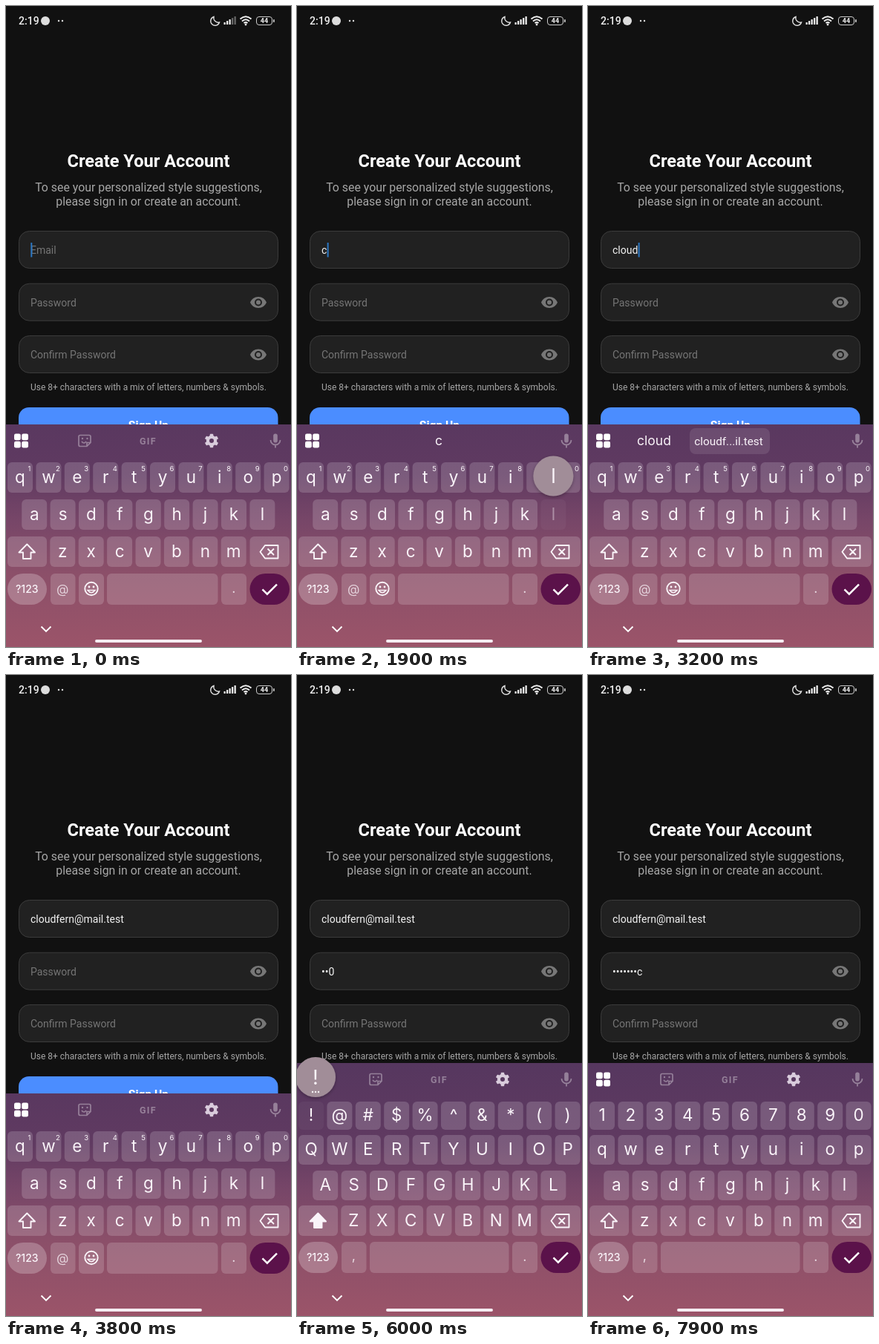
Write an HTML page that moves like this. It is 384 by 864 pixels and loops after 8000 ms.

```html
<!DOCTYPE html>
<html lang="en">
<head>
<meta charset="utf-8">
<title>Sign-up form</title>
<style>
  html, body { margin: 0; width: 100%; height: 100%; overflow: hidden; background: #111; }
  svg { display: block; width: 384px; height: 864px; font-family: Roboto, sans-serif; }
  .key { font-family: Inter, sans-serif; }
</style>
</head>
<body>
<svg id="stage" viewBox="0 0 384 864"></svg>
<script>
const LOOP = 8000, PITCH = 38.4;
const EMAIL = 'cloudfern@mail.test', CHIP = 'cloudf...il.test';
const DIGITS = '1234567890', SYMBOLS = '!@#$%^&*()';
const LETTERS = ['qwertyuiop', 'asdfghjkl', 'zxcvbnm'];
const ROW_X = [19, 38.2, 76.3];
const INK = '#faf4f9';

// Key presses: character, finger down, finger up
const emailKeys = [['c', 1600, 1700], ['l', 1900, 2000], ['o', 2100, 2200],
  ['u', 2500, 2600], ['d', 2800, 2900]];
const passKeys = [['X', 4700, 4700], ['v', 4800, 4900], ['0', 5300, 5300], ['!', 6000, 6100],
  ['f', 6400, 6500], ['7', 6700, 6800], ['x', 6900, 7000], ['c', 7050, 7100]];
const allKeys = [...emailKeys, ...passKeys];
const FILLED = 3300, NEXT = 3900, READY = 4200;
const caretResets = [0, FILLED, READY, ...allKeys.map(k => k[2])];

const stage = document.getElementById('stage');
const pen = document.createElement('canvas').getContext('2d');
const within = (t, a, b) => t >= a && t < b;
const esc = s => s.replace(/&/g, '&amp;').replace(/</g, '&lt;');

const rect = (x, y, w, h, r, fill, more = '') =>
  `<rect x="${x}" y="${y}" width="${w}" height="${h}" rx="${r}" fill="${fill}" ${more}/>`;
const circle = (x, y, r, fill, more = '') =>
  `<circle cx="${x}" cy="${y}" r="${r}" fill="${fill}" ${more}/>`;
const line = (d, color, w, more = '') =>
  `<path d="${d}" fill="none" stroke="${color}" stroke-width="${w}" ${more}/>`;
const text = (s, x, y, size, fill, more = '') =>
  `<text x="${x}" y="${y}" font-size="${size}" fill="${fill}" ${more}>${esc(s)}</text>`;
const MID = 'text-anchor="middle"';
const label = (s, x, y, size, more = '') =>
  text(s, x, y, size, INK, `class="key" ${MID} ${more}`);

function statusBar(t) {
  let s = text('2:19', 17, 25, 14, '#eee', 'font-weight="500"') + circle(53, 20, 6, '#ddd') +
    circle(71, 20, 1.2, '#ddd') + circle(76, 20, 1.2, '#ddd') +
    line('M280 14.5A6 6 0 1 0 287.5 22A6.2 6.2 0 0 1 280 14.5Z', '#ddd', 1.4);
  for (let i = 0; i < 5; i++) {
    const h = 3 + i * 2;
    s += rect(293.5 + i * 3.5, 25 - h, 2.3, h, 0.6, t < 1000 && i > 2 ? '#666' : '#eee');
  }
  s += line('M315.5 17.5Q323 11 330.5 17.5M318 20.5Q323 16 328 20.5M320.5 23Q323 21 325.5 23', '#eee', 2) +
    circle(323, 25, 1.4, '#eee');
  return s + rect(337.5, 14.5, 21, 11, 3.5, 'none', 'stroke="#ccc"') + rect(360, 18, 1.8, 4, 0.8, '#ccc') +
    text('44', 348, 23.3, 9, '#eee', MID + ' font-weight="700"');
}

function eye(y) {
  return `<path transform="translate(328 ${y - 12})" fill="#777" fill-rule="evenodd" d="M12 4.5C7 4.5 2.7 7.6 1 12c1.7 4.4 6 7.5 11 7.5s9.3-3.1 11-7.5c-1.7-4.4-6-7.5-11-7.5zM12 17a5 5 0 1 1 0-10 5 5 0 0 1 0 10zm0-8a3 3 0 1 0 0 6 3 3 0 0 0 0-6z"/>`;
}

function field(y, hint, value, caret) {
  let s = rect(17.5, y, 349, 50, 14, '#212121', 'stroke="#3c3c3c"') +
    text(value || hint, 33, y + 30.5, 14, value ? '#f2f2f2' : '#757575');
  if (caret) {
    pen.font = '14px Roboto, sans-serif';
    s += rect((33.3 + pen.measureText(value).width).toFixed(2), y + 15.5, 2, 19.5, 0, '#2b78c4');
  }
  return s;
}

function form(t) {
  const typed = keys => keys.filter(k => t >= k[2]).map(k => k[0]).join('');
  const email = t >= FILLED ? EMAIL : typed(emailKeys);
  const pass = typed(passKeys).replace(/.(?=.)/g, '•');
  const reset = Math.max(...caretResets.filter(r => r <= t));
  const caret = (t - reset) % 1000 < 500;
  const sub = (s, y) => text(s, 192, y, 15.87, '#a6a6a6', MID);
  return text('Create Your Account', 192, 217, 23.6, '#fff', MID + ' font-weight="700"') +
    sub('To see your personalized style suggestions,', 250) +
    sub('please sign in or create an account.', 269) +
    field(303.5, 'Email', email, caret && t < NEXT) +
    field(374.2, 'Password', pass, caret && t >= NEXT) +
    field(444.5, 'Confirm Password', '', false) + eye(399.5) + eye(470) +
    text('Use 8+ characters with a mix of letters, numbers & symbols.', 192, 517.5, 11.97, '#a6a6a6', MID) +
    rect(17, 541, 349.5, 50, 14, '#4b8dff') +
    text('Sign Up', 192, 571, 15.6, '#fff', MID + ' font-weight="700"');
}

function gear(x, y) {
  let s = circle(x, y, 5.1, 'none', 'stroke="#d9ccdc" stroke-width="4.2"');
  for (let i = 0; i < 6; i++)
    s += rect(x - 2.3, y - 9.3, 4.6, 4, 1, '#d9ccdc', `transform="rotate(${i * 60} ${x} ${y})"`);
  return s;
}

function toolbar(t, y) {
  let s = '';
  for (const dx of [11, 21.2]) for (const dy of [-9.5, 0.7]) s += rect(dx, y + dy, 8.8, 8.8, 2.3, '#fff');
  s += `<g opacity=".36">` + rect(360.2, y - 9.5, 5.6, 12, 2.8, '#fff') +
    line(`M356.5 ${y - 1}a6.5 6.5 0 0 0 13 0M363 ${y + 5.5}v4`, '#fff', 1.8) + '</g>';
  const count = emailKeys.filter(k => t >= k[2]).length;
  if (count && t < FILLED) {
    const word = EMAIL.slice(0, count);
    if (count < 3) return s + label(word, 191, y + 6, 17.5);
    if (t >= 3200) s += rect(137, y - 17, 108, 35, 8, '#fff', 'opacity=".1"');
    return s + label(word, 89, y + 6, 17.5) +
      text(CHIP, 189.5, y + 6, 15.3, INK, MID);
  }
  if ([[4700, 5000], [6500, 6700], [7000, 7200]].some(([a, b]) => within(t, a, b))) return s;
  return s + '<g opacity=".36">' +
    line(`M100 ${y - 7.5}h12q2 0 2 2v8l-5 5h-9q-2 0 -2-2v-11q0-2 2-2M114 ${y + 2.5}h-5v5M102 ${y + 1}q3 4 6 0`, '#fff', 1.7) +
    circle(103, y - 3, 1.2, '#fff') + circle(109.5, y - 3, 1.2, '#fff') +
    text('GIF', 191.5, y + 4.5, 12.5, '#fff', MID + ' font-weight="700" letter-spacing="1.3"') + '</g>' +
    gear(277, y);
}

const cap = (x, y, w, h = 41, r = 6, o = 0.17) => rect(x, y, w, h, r, '#fff', `opacity="${o}"`);

// Bottom row of keys, starting at height y
function footer(t, y, secret) {
  let s = cap(2, y, 53, 42, 21, 0.24) + label('?123', 28.3, y + 25.5, 14, 'font-weight="500"') +
    cap(60, y, 33.5, 42);
  if (secret) s += label(',', 76.3, y + 25, 18, 'opacity=".8"') + cap(98, y, 187.5, 42);
  else s += label('@', 76.3, y + 26.5, 17, 'opacity=".75"') + cap(98, y, 34, 42) + cap(136, y, 149.5, 42) +
    circle(115, y + 20.5, 8.7, 'none', `stroke="${INK}" stroke-width="1.9"`) +
    circle(112, y + 18, 1.4, INK) + circle(118, y + 18, 1.4, INK) +
    line(`M110 ${y + 22.5}q5 6.5 10 0z`, INK, 1.5);
  return s + cap(290, y, 34, 42) + label('.', 306.8, y + 26, 18, 'opacity=".8"') +
    rect(328.5, y, 53.5, 42, 21, within(t, 3700, 3800) ? '#7d3a6c' : '#5b124a') +
    line(`M345.5 ${y + 21.3}l6.4 6.4L365 ${y + 14.6}`, '#fff', 2.5);
}

function keyboard(t) {
  const secret = t >= NEXT, top = secret ? 523 : 564;
  const upper = within(t, READY, 4700) || within(t, 5700, 6100);
  const ys = secret ? [620, 668, 715] : [615, 665, 715];
  const rows = LETTERS.map((keys, i) => ({ keys, x: ROW_X[i], y: ys[i], h: secret && i < 2 ? 40 : 41 }));
  if (secret) rows.push({ keys: upper ? SYMBOLS : DIGITS, x: 19, y: 575, h: 38, top: true });

  let s = rect(0, top, 384, 864 - top, 0, `url(#kb)`) + toolbar(t, top + 22), pops = '';
  for (const row of rows) [...row.keys].forEach((ch, i) => {
    const x = row.x + i * PITCH, mid = row.y + row.h / 2;
    const matches = k => k[0].toLowerCase() === ch ||
      row.top && (DIGITS[i] === k[0] || SYMBOLS[i] === k[0]);
    const press = allKeys.find(k => matches(k) && within(t, k[1], k[2] + 100));
    const down = press && t < press[2];
    s += cap(x - 17, row.y, 34, row.h, 6, down ? 0.04 : 0.17) +
      label(upper ? ch.toUpperCase() : ch, x, mid + 7.3, 22.5, down && !row.top ? 'opacity=".4"' : '');
    if (!secret && row.keys === LETTERS[0]) s += label(DIGITS[i], x + 12.5, row.y + 12, 9.5);
    if (press) {
      const px = Math.min(359, Math.max(25, x)), py = mid - 52;
      pops += circle(px, py, 27, '#a18d98', 'filter="url(#shade)"') + label(press[0], px, py + 9.5, 27);
      if (row.top) for (const d of [-4, 0, 4]) pops += circle(px + d, py + 20, 1.2, INK);
    }
  });

  // Shift, backspace and the navigation bar
  s += cap(2, 715, 53) + cap(328.5, 715, 53.5) +
    line('M28.3 725.5L39 736.5H33.5V745H23V736.5H17.5Z', INK, 1.9, `stroke-linejoin="round" style="fill:${upper ? INK : 'none'}"`) +
    line('M349 727H366.5V744.5H349L342.5 735.7ZM352.5 731.5l8.5 8.5m0-8.5l-8.5 8.5', INK, 1.9, 'stroke-linejoin="round"') +
    footer(t, secret ? 764 : 765, secret) +
    line('M47.5 836.5L54 843L60.5 836.5', '#fff', 1.9) + rect(120, 854, 144, 4, 2, '#f5edf2');
  return s + pops;
}

const DEFS = `<defs><linearGradient id="kb" x2="0" y1="523" y2="864" gradientUnits="userSpaceOnUse">
  <stop stop-color="#56375f"/><stop offset=".32" stop-color="#603a61"/>
  <stop offset=".5" stop-color="#774668"/><stop offset=".7" stop-color="#8b4f69"/>
  <stop offset="1" stop-color="#9b5469"/></linearGradient>
  <filter id="shade" x="-30%" y="-30%" width="160%" height="160%">
  <feDropShadow dx="0" dy="1.5" stdDeviation="2" flood-opacity=".3"/></filter></defs>`;

let shown = '';
function frame() {
  const t = performance.now() % LOOP;
  const picture = DEFS + rect(0, 0, 384, 864, 0, '#111') + statusBar(t) + form(t) + keyboard(t);
  if (picture !== shown) stage.innerHTML = shown = picture;
  requestAnimationFrame(frame);
}
frame();
</script>
</body>
</html>
```
